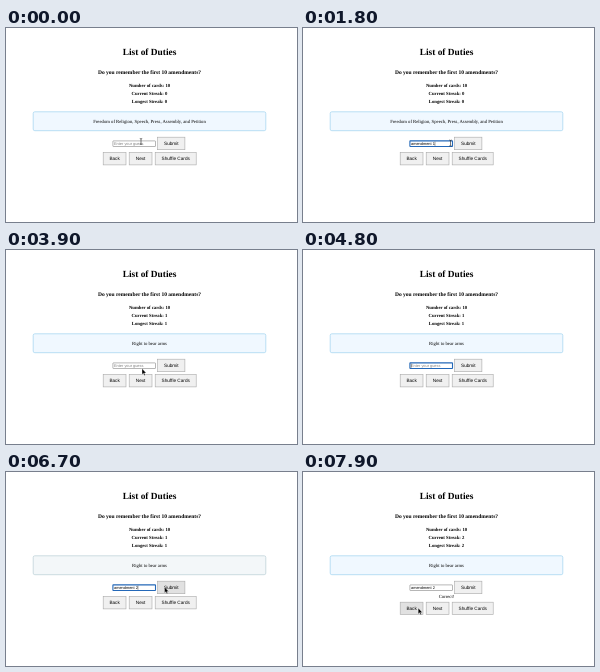
Recreate the animation shown at these times as an HTML page. Size 291 by 194 pixels, loop 8000 ms.

```html
<!DOCTYPE html>
<html lang="en">
<head>
<meta charset="utf-8">
<title>Flash cards</title>
<style>
  html, body { margin: 0; height: 100%; overflow: hidden; background: #fff; }
  svg { display: block; width: 291px; height: 194px; }
  text { font: 4.7px "Liberation Serif", serif; text-anchor: middle; text-rendering: geometricPrecision; }
  .bold { font-weight: bold; }
  .button text { font-family: "Liberation Sans", sans-serif; }
  .button rect { fill: #f0f0f0; stroke: #a9a9a9; stroke-width: .6; }
  .button.hover rect { fill: #e1e1e1; }
  #card { fill: #f0f8ff; stroke: #9fd3f0; stroke-width: .7; }
  #card.muted { fill: #f3f7f9; stroke: #b9ced6; }
  #field { fill: #fff; stroke: #858585; stroke-width: .6; }
  #field.focus { stroke: #2468b8; stroke-width: 1.1; }
  #entry { font: 3.9px "Liberation Sans", sans-serif; text-anchor: start; white-space: pre; }
</style>
</head>
<body>
<svg viewBox="0 0 291 194">
  <text class="bold" x="143.5" y="26.7" style="font-size:9.4px">List of Duties</text>
  <text class="bold" x="143.5" y="45.5" style="font-size:5.5px">Do you remember the first 10 amendments?</text>
  <text class="bold" x="143.5" y="58.6">Number of cards: 10</text>
  <text class="bold" x="143.5" y="67" id="current"></text>
  <text class="bold" x="143.5" y="75.4" id="longest"></text>
  <rect id="card" x="27.2" y="83.8" width="232.6" height="18.9" rx="1.6"/>
  <text x="143.5" y="94.9" id="clue"></text>
  <rect id="field" x="106.9" y="112.9" width="42.6" height="5.6" rx=".4"/>
  <text id="entry" x="108" y="117"></text>
  <path id="caret" stroke="#222" stroke-width=".4"/>
  <g class="button" id="submit"><rect x="151.6" y="109.2" width="27.3" height="12.5"/><text x="165.3" y="117">Submit</text></g>
  <text x="143.5" y="126" id="verdict">Correct!</text>
  <g id="row">
    <g class="button" id="back"><rect x="97.2" y="124.6" width="22.8" height="12.3"/><text x="108.6" y="132.4">Back</text></g>
    <g class="button" id="next"><rect x="123.2" y="124.6" width="22.8" height="12.3"/><text x="134.6" y="132.4">Next</text></g>
    <g class="button"><rect x="149.2" y="124.6" width="41" height="12.3"/><text x="169.7" y="132.4">Shuffle Cards</text></g>
  </g>
  <path id="arrow" d="M0 0V5.9L1.4 4.7 2.3 6.8 3.3 6.4 2.4 4.4H4.2Z" stroke="#fff" stroke-width=".35"/>
  <path id="beam" d="M-1.2-3Q0-3 0-2.2Q0-3 1.2-3M0-2.2V2.2M-1.2 3Q0 3 0 2.2Q0 3 1.2 3" fill="none" stroke="#222" stroke-width=".6"/>
</svg>
<script>
const $ = id => document.getElementById(id);
const within = (t, a, b) => t >= a && t < b;
const show = (id, on) => $(id).style.display = on ? '' : 'none';
const place = (id, x, y) => $(id).setAttribute('transform', `translate(${x} ${y})`);

// Pointer stops: time, x, y
const trips = [
  [[1900, 153, 115], [2100, 160, 116], [2400, 159, 117], [2700, 148.5, 132.3], [2900, 139, 138],
   [3200, 140, 132.5], [3500, 136.3, 122.5], [3600, 136.3, 122.5], [3900, 136, 118.6],
   [4200, 136, 118.6], [4400, 136, 117]],
  [[6500, 152, 117], [6700, 158.5, 115], [6900, 160, 115.5], [7100, 160, 115.5], [7700, 115.2, 136], [8000, 115.2, 136]]
];
// I-beam: start, end, x, y
const beams = [[0, 100, 135, 113.5], [1800, 1900, 147.5, 115], [4400, 4600, 136, 116]];

function pointerAt(t) {
  const stops = trips.find(p => within(t, p[0][0], p[p.length - 1][0]));
  if (!stops) return null;
  const i = stops.findIndex(s => s[0] > t);
  const [a, b] = [stops[i - 1], stops[i]];
  const k = (t - a[0]) / (b[0] - a[0]);
  return [a[1] + (b[1] - a[1]) * k, a[2] + (b[2] - a[2]) * k];
}

function typed(t) {
  if (t < 3200) return 'amendment 1'.slice(0, Math.max(0, (t - 400) / 100));
  if (t < 5000) return '';
  if (t < 5200) return 'a';
  return 'amendment 2'.slice(0, t < 6400 ? Math.min(10, (t - 5000) / 100) : 11);
}

function draw(now) {
  const t = Math.floor(now % 8000 / 100) * 100;
  const score = t < 2100 ? 0 : t < 6800 ? 1 : 2;
  const correct = within(t, 2100, 3200) || t >= 6800;
  const focus = within(t, 300, 2100) || within(t, 4500, 6800);
  const entry = typed(t);

  $('current').textContent = 'Current Streak: ' + score;
  $('longest').textContent = 'Longest Streak: ' + score;
  $('clue').textContent = t < 3200
    ? 'Freedom of Religion, Speech, Press, Assembly, and Petition'
    : 'Right to bear arms';
  $('card').classList.toggle('muted', t === 6700);
  $('field').classList.toggle('focus', focus);
  $('entry').textContent = entry || 'Enter your guess';
  $('entry').setAttribute('fill', entry ? '#000' : '#808080');
  show('caret', focus);
  const end = 108.2 + (entry ? $('entry').getComputedTextLength() : 0);
  $('caret').setAttribute('d', `M${end} 113.6V117.9`);

  show('verdict', correct);
  place('row', 0, correct ? 5.6 : 0);
  $('submit').classList.toggle('hover', within(t, 2000, 2500) || within(t, 6600, 7200));
  $('next').classList.toggle('hover', within(t, 2900, 3300));
  $('back').classList.toggle('hover', t >= 7900);

  const tip = pointerAt(t);
  show('arrow', tip);
  if (tip) place('arrow', ...tip);
  const beam = beams.find(b => within(t, b[0], b[1]));
  show('beam', beam);
  if (beam) place('beam', beam[2], beam[3]);
}

const start = performance.now();
function tick() {
  draw(performance.now() - start);
  requestAnimationFrame(tick);
}
tick();
</script>
</body>
</html>
```
